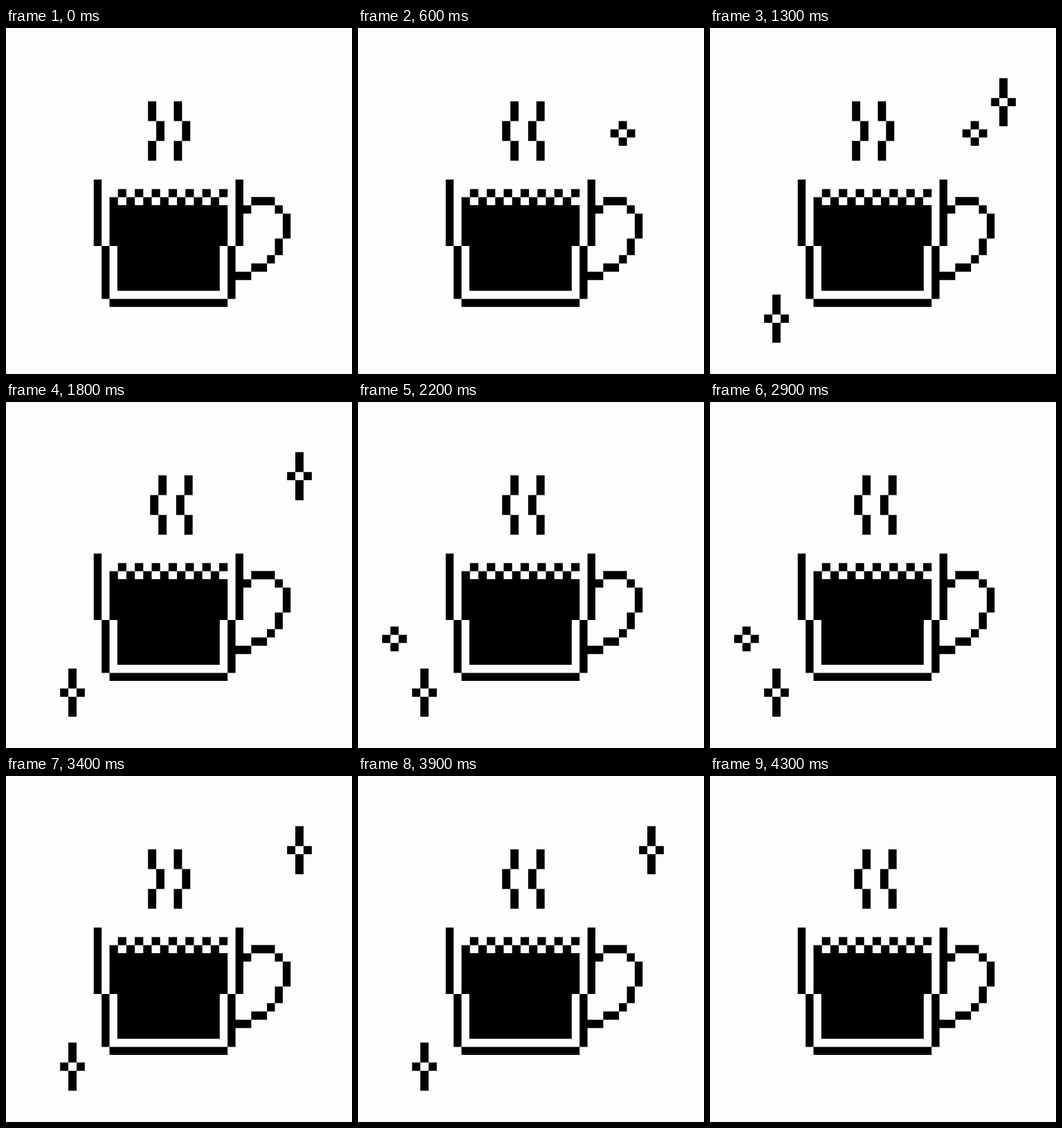
An HTML page that plays this animation: 500 px wide and 500 px high, repeating every 4.4 s.

```html
<!DOCTYPE html>
<html lang="en">
<head>
<meta charset="utf-8">
<title>Coffee</title>
<style>
html, body { margin: 0; width: 100%; height: 100%; overflow: hidden; background: #fdfdfd; }
svg { display: block; width: 100%; height: 100%; }
</style>
</head>
<body>
<svg id="stage" viewBox="0 0 500 500"></svg>
<script>
const LOOP = 4400;
const SPARKLE_LIFE = 1300;
const SPARKLES_END = 4100;
const STEAM_FLIPS = [500, 1100, 1800, 2300, 2800, 3400, 3800];
const CELL = 11.9;
const CUP_CELL = 11.38;
const CUP_LEFT = 126.8;

const stage = document.getElementById('stage');
const box = (x, y, w, h) => `M${x} ${y}h${w}v${h}h${-w}Z`;

function shape(...boxes) {
  const path = document.createElementNS('http://www.w3.org/2000/svg', 'path');
  path.setAttribute('d', boxes.join(''));
  stage.append(path);
  return path;
}

// The cup is 19 columns wide; bars are placed by column and mirrored.
const column = i => CUP_LEFT + i * CUP_CELL;
const bar = (inset, top, bottom) =>
  box(column(inset), top, (19 - 2 * inset) * CUP_CELL, bottom - top);
const walls = (inset, top, bottom) => [inset, 18 - inset]
  .map(i => box(column(i), top, CUP_CELL, bottom - top)).join('');

function foam() {
  const size = 15 * CUP_CELL / 14;
  return Array.from({ length: 14 }, (_, i) =>
    box(column(2) + i * size, i % 2 ? 232.7 : 244.5, size, 11.8)).join('');
}

// Walks the handle cell by cell in compass directions.
function handle() {
  let x = 19, y = 1;
  const cell = () => box(column(x), 244.2 + y * 12, CUP_CELL, 12);
  return cell() + 'NE E E SE SE S S SW S SW SW W SW W'.split(' ').map(way => {
    x += way.includes('E') - way.includes('W');
    y += way.includes('S') - way.includes('N');
    return cell();
  }).join('');
}

function steam(x, bend) {
  const puff = i => box(x + (i % 2) * bend, 106 + i * 28.6, CELL, 28.6);
  return [0, 1, 2].map(puff).join('');
}

// Four arms around an empty centre cell.
function sparkle(x, y, arm) {
  return shape(
    box(x + CELL, y, CELL, arm), box(x + CELL, y + arm + CELL, CELL, arm),
    box(x, y + arm, CELL, CELL), box(x + 2 * CELL, y + arm, CELL, CELL));
}

shape(walls(0, 219, 315), walls(1, 315, 391.4), bar(2, 391.4, 403),
  bar(2, 256, 315), bar(3, 315, 379.7), foam(), handle());

const steamRight = shape(steam(205.2, CELL), steam(242.5, CELL));
const steamLeft = shape(steam(220.2, -CELL), steam(257.8, -CELL));

const sparkles = [
  { node: sparkle(364.8, 134.5, CELL), starts: [500] },
  { node: sparkle(406.2, 72.4, 28.8), starts: [800, 3400] },
  { node: sparkle(78.2, 385.3, 28.8), starts: [1100, 2800] },
  { node: sparkle(34.9, 324.5, CELL), starts: [1900] }
];

function show(node, visible) {
  node.setAttribute('visibility', visible ? 'visible' : 'hidden');
}

function draw(t) {
  const flipped = STEAM_FLIPS.filter(flip => t >= flip).length % 2 === 1;
  show(steamLeft, flipped);
  show(steamRight, !flipped);
  for (const { node, starts } of sparkles) {
    show(node, t < SPARKLES_END && starts.some(s => t >= s && t < s + SPARKLE_LIFE));
  }
}

const start = performance.now();
function tick() {
  draw((performance.now() - start) % LOOP);
  requestAnimationFrame(tick);
}
tick();
</script>
</body>
</html>
```
